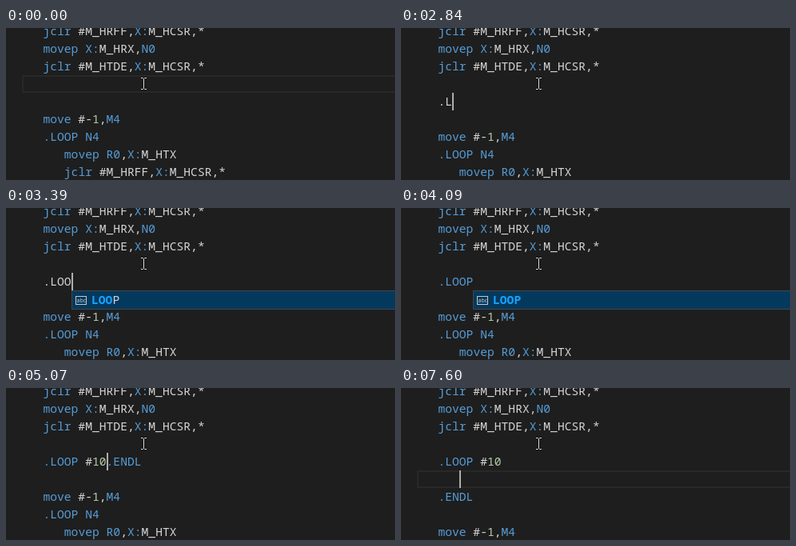
Animation of 487x190 px, one loop 8000 ms. Source, as an HTML page:

```html
<!DOCTYPE html>
<html lang="en">
<head>
<meta charset="utf-8">
<title>Assembly snippet completion</title>
<style>
  html, body { margin: 0; width: 100%; height: 100%; overflow: hidden; background: #1e1e1e; }
  svg { display: block; width: 487px; height: 190px; }
  text { font: 14.667px "Noto Sans Mono", "DejaVu Sans Mono", monospace; fill: #d4d4d4; white-space: pre; }
  .key { fill: #569cd6; }
  .num { fill: #b5cea8; }
  .hit { fill: #18a3ff; font-weight: bold; }
  .icon { font: 7px "Open Sans", sans-serif; }
</style>
</head>
<body>
<svg viewBox="0 0 487 190">
  <rect width="487" height="190" fill="#1e1e1e"/>
  <g id="view"></g>
  <g fill="none">
    <path id="beam" d="M169 62.5H171.5L172.5 63.5L173.5 62.5H176M172.5 63.5V75.5M169 76.5H171.5L172.5 75.5L173.5 76.5H176" stroke="#111" stroke-width="3"/>
    <use href="#beam" style="display:none"/>
    <path d="M169 62.5H171.5L172.5 63.5L173.5 62.5H176M172.5 63.5V75.5M169 76.5H171.5L172.5 75.5L173.5 76.5H176" stroke="#e4e4e4"/>
  </g>
</svg>
<script>
const LOOP_MS = 8000, LEFT = 20, CHAR = 8.8, ROW = 22;
const view = document.getElementById('view');
const colX = col => LEFT + col * CHAR;
const rowY = row => row * ROW - 7;

const head = [
  '   jclr #M_HRFF,X:M_HCSR,*',
  '   movep X:M_HRX,N0',
  '   jclr #M_HTDE,X:M_HCSR,*'
];
const tail = [
  '   move #-1,M4',
  '   .LOOP N4',
  '      movep R0,X:M_HTX',
  '      jclr #M_HRFF,X:M_HCSR,*'
];

const typed = s => ['', '   ' + s, ''];
const done = ['', '   .LOOP #10', '   .ENDL', ''];
const open = ['', '   .LOOP #10', '', '   .ENDL', ''];
const list = (col, hit, rows, items) => ({ col, hit, rows, items });
const loopList = (col, hit, rows = 1) => list(col, hit, rows, ['LOOP']);

// Each step changes only the fields it names; caret is [row, column].
const steps = [
  { t: 0, body: ['', ''], caret: null, line: 3, popup: null, boxes: [] },
  { t: 430, caret: [3, 0] },
  { t: 830, body: typed(''), caret: [4, 0], line: null },
  { t: 1420, caret: [4, 3] },
  { t: 1980, caret: null },
  { t: 2410, caret: [4, 3] },
  { t: 2560, body: typed('.'), caret: [4, 4] },
  { t: 2840, body: typed('.L'), caret: [4, 5] },
  { t: 2960, popup: list(5, 1, 4, ['L0', 'L1', 'L2', 'LCV']) },
  { t: 3240, body: typed('.LO'), caret: [4, 6], popup: loopList(5, 2, 4) },
  { t: 3390, body: typed('.LOO'), caret: [4, 7], popup: loopList(7, 3) },
  { t: 3510, body: typed('~.LOOP'), caret: [4, 8], popup: loopList(7, 4) },
  { t: 3660, body: typed('.LOOP'), popup: loopList(8, 4) },
  { t: 4090, caret: null },
  { t: 4370, body: typed('.LOOP ~.ENDL'), caret: [4, 9], popup: null, boxes: [4, 10] },
  { t: 4490, body: typed('.LOOP .ENDL'), boxes: [] },
  { t: 4790, body: typed('.LOOP #.ENDL'), caret: [4, 10] },
  { t: 4920, body: typed('.LOOP #1.ENDL'), caret: [4, 11] },
  { t: 5070, body: typed('.LOOP #10.ENDL'), caret: [4, 12] },
  { t: 5350, body: done, caret: [5, 3], line: 5 },
  { t: 5900, caret: null },
  { t: 6200, body: open, caret: [6, 3], line: 6 },
  { t: 6480, caret: [5, 3], line: 5 },
  { t: 6600, caret: [5, 6] },
  { t: 7160, caret: null },
  { t: 7600, caret: [5, 6] }
];
for (let i = 1; i < steps.length; i++) steps[i] = { ...steps[i - 1], ...steps[i] };

const rect = (x, y, w, h, attrs) =>
  `<rect x="${x}" y="${y}" width="${w}" height="${h}" ${attrs}/>`;
const span = (cls, s) => `<tspan class="${cls}">${s}</tspan>`;

// A leading ~ leaves a word uncoloured.
const token = /~\S+|\.LOOP|\.ENDL|\bmovep?\b|\bjclr\b|\bX:|\b[RNM]\d|\b\d+/g;
const paint = s => s.replace(token, m =>
  m[0] === '~' ? m.slice(1) : span(/^\d/.test(m) ? 'num' : 'key', m));

function codeLine(s, row) {
  const code = s.trimStart();
  return code && `<text x="${colX(s.length - code.length)}" y="${rowY(row) + 16}">${paint(code)}</text>`;
}

function popupBox({ col, hit, rows, items }) {
  const x = Math.round(colX(col)), y = rowY(5);
  let out = rect(x + .5, y + .5, 500, rows * ROW + 1, 'fill="#252526" stroke="#454545"')
    + rect(x + 1, y + 1, 500, ROW, 'fill="#04395e"');
  items.forEach((s, i) => {
    const top = y + 1 + i * ROW;
    out += rect(x + 5.5, top + 6.5, 13, 10, 'fill="none" stroke="#c5c5c5"')
      + `<text class="icon" x="${x + 6.5}" y="${top + 14}">abc</text>`
      + `<text x="${x + 25}" y="${top + 16}">${span('hit', s.slice(0, hit))}${s.slice(hit)}</text>`;
  });
  return out;
}

function draw({ body, caret, line, popup, boxes }) {
  let out = '';
  if (line !== null)
    out += rect(LEFT + 1, rowY(line) + 1, 490, ROW - 2, 'fill="none" stroke="#282828" stroke-width="2"');
  for (const col of boxes)
    out += rect(Math.round(colX(col)) + .5, rowY(4) + .5, 34, ROW - 1,
      'fill="#006400" fill-opacity=".1" stroke="#888"');
  out += [...head, ...body, ...tail].map(codeLine).join('');
  if (popup) out += popupBox(popup);
  if (caret)
    out += rect(Math.round(colX(caret[1])), rowY(caret[0]), 2, ROW, 'fill="#aeafad"');
  view.innerHTML = out;
}

let shown;
function tick() {
  const t = performance.now() % LOOP_MS;
  const step = steps.findLast(s => s.t <= t);
  if (step !== shown) draw(shown = step);
  requestAnimationFrame(tick);
}
tick();
</script>
</body>
</html>
```
